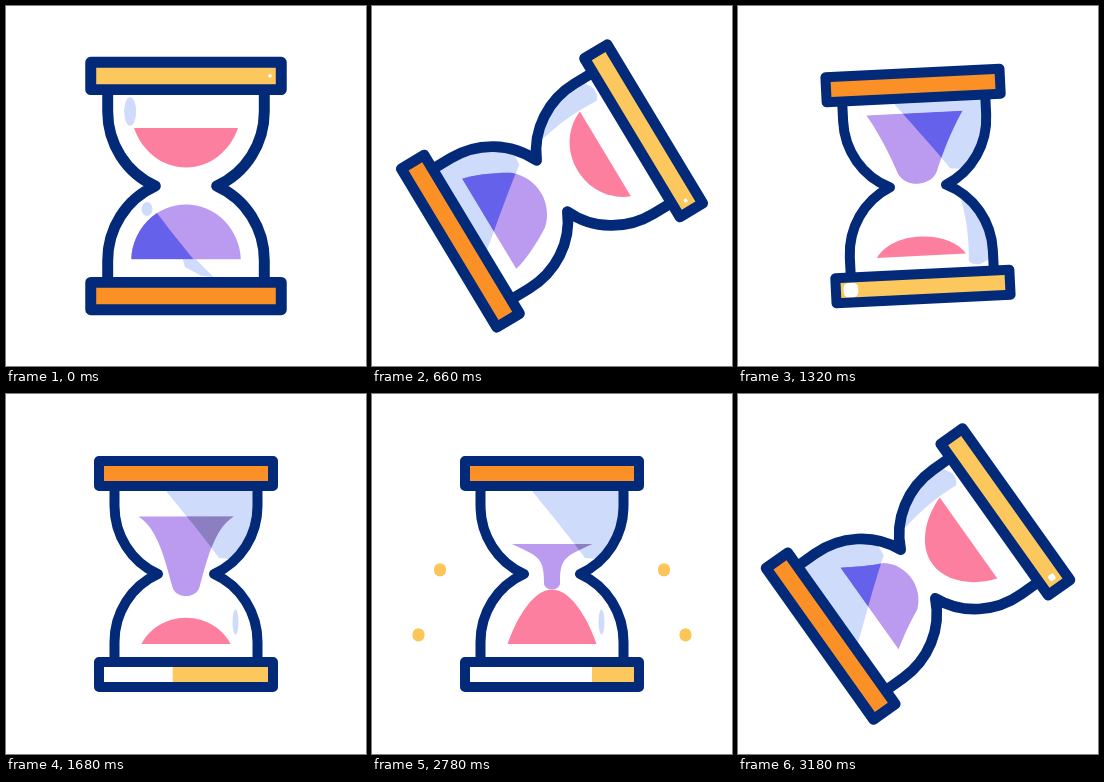
Animation, 360 px wide and 360 px high, one loop 3200 ms. Source, as an HTML page:

```html
<!DOCTYPE html>
<html lang="en">
<head>
<meta charset="utf-8">
<title>Hourglass</title>
<style>
html, body { margin: 0; width: 100%; height: 100%; overflow: hidden; background: #fff; }
svg { display: block; width: 100vw; height: 100vh; }
.line { stroke: #022a78; stroke-width: 10; stroke-linejoin: round; }
.shade { fill: #cfdbfa; }
.drop { fill: #fcc557; }
</style>
</head>
<body>
<svg viewBox="-180 -180 360 360">
  <defs>
    <path id="wall" d="M-71.5 -88V-68C-71.5 -39 -55 -12 -28 0C-55 12 -71.5 39 -71.5 68V88"/>
    <clipPath id="inside">
      <path d="M-71 -88V-68C-71 -39 -55 -12 -28 0C-55 12 -71 39 -71 68V88H71V68C71 39 55 12 28 0C55 -12 71 -39 71 -68V-88Z"/>
    </clipPath>
    <clipPath id="inSand"><path id="sandClip"/></clipPath>
    <path id="gloss" d="M-23 -87C-8 -68 14 -42 33 -16L80 -12V-87Z"/>
  </defs>
  <g id="drops"></g>
  <g id="glass">
    <g clip-path="url(#inside)">
      <use id="fullShade" class="shade" href="#gloss"/>
      <path id="band" class="shade" d="M42 14C48 40 48 60 47 77Q49 81 58 81L80 70V14Z"/>
      <ellipse id="glint" class="shade"/>
      <g id="restShade" class="shade">
        <ellipse cx="35.6" cy="-21" rx="5" ry="6.5"/>
        <path d="M3 -66L-9 -67L-25 -83L-14 -82L1 -74Z"/>
      </g>
      <path id="sand" fill="#bb9bf0"/>
      <g clip-path="url(#inSand)"><use id="overlap" href="#gloss"/></g>
      <path id="mound" fill="#fc7fa0"/>
    </g>
    <g class="line" fill="none">
      <use href="#wall"/>
      <use href="#wall" transform="scale(-1 1)"/>
    </g>
    <rect class="line" x="-87" y="-113" width="174" height="25" fill="#fb9027"/>
    <rect x="-87" y="88" width="174" height="25" fill="#fcc75c"/>
    <rect id="shine" fill="#fff"/>
    <rect class="line" x="-87" y="88" width="174" height="25" fill="none"/>
  </g>
</svg>
<script>
const LOOP = 3200, REST = 220, POUR = 1400, LIFT = 2800;
const $ = id => document.getElementById(id);
const set = (el, attrs) => { for (const k in attrs) el.setAttribute(k, attrs[k]); };
const show = (id, on) => set($(id), { visibility: on ? "visible" : "hidden" });
const clamp = x => Math.min(1, Math.max(0, x));
const mix = (a, b, u) => a + (b - a) * u;
const sine = x => (1 - Math.cos(Math.PI * clamp(x))) / 2;

const drops = [-1, 1].flatMap(side => [0, 1].map(row => {
  const el = document.createElementNS("http://www.w3.org/2000/svg", "rect");
  el.setAttribute("class", "drop");
  $("drops").append(el);
  return { el, x: side * (112 + 21.5 * row), y: 65 * row };
}));

// 1 = upside down, 0 = upright
function turn(t) {
  if (t < REST) return 1;
  return t < POUR + 100 ? 1 - sine((t - 180) / 1240) : sine((t - LIFT) / 606);
}

// In the shapes below p is the turn and q the share of sand poured out;
// each measure blends from its upright value to its upside-down value.
function moundShape(p, q) {
  const w = mix(44.5, 47.5, p), base = mix(70, 53, p);
  const h = mix(19 + 36 * q, 36, p);
  const rise = mix(0.6, 0.38, q * (1 - p));
  const top = base - h, sx = 0.84 * w, sy = base - rise * h, tx = 0.46 * w;
  return `M${-w} ${base}C${-sx} ${sy} ${-tx} ${top} 0 ${top}C${tx} ${top} ${sx} ${sy} ${w} ${base}Z`;
}

function sandShape(p, q) {
  const left = (1 - q) ** 3;
  const moundTop = 51 - 36 * q;
  const w = mix(48 - 8 * q * q, 50, p);
  const level = mix(-30 - 43 * (1 - q) ** 2, -67, p);
  const low = mix(Math.min(120 * q - 2, moundTop), -17, p);
  const neck = mix(8 + 11 * left, 35, p);
  const neckY = low - 6 - neck / 4;
  const ax = mix(15 + 25 * left, 50, p), ay = level + 12;
  const bx = neck + 9 * mix(1 - q, 1, p), by = neckY - mix(25, 9, p);
  const tipX = 8 + neck / 5, tipY = mix(neckY, low, 4 / 3);
  return `M${-w} ${level}C${-ax} ${ay} ${-bx} ${by} ${-neck} ${neckY}` +
    `C${-tipX} ${tipY} ${tipX} ${tipY} ${neck} ${neckY}C${bx} ${by} ${ax} ${ay} ${w} ${level}Z`;
}

function drawShine(p, q) {
  const len = 3 + (1 - p) ** 3 * (12 + 107 * clamp(2.5 * q));
  const h = Math.min(16, len);
  set($("shine"), {
    x: -78 - Math.min(4, len / 12), y: 100.5 - h / 2,
    width: len, height: h, rx: len < 20 ? h / 3 : 0
  });
}

function drawDrops(t) {
  const u = clamp((t - 1830) / 1070);
  const h = Math.min(18, 120 * u, 118 * (1 - u)), w = Math.min(12, h);
  const fall = -77 + 82 * u;
  for (const { el, x, y } of drops)
    set(el, { x: x - w / 2, y: y + fall - h / 2, width: w, height: h, rx: w / 2, ry: w / 2 });
}

function draw(t) {
  const p = turn(t), q = clamp((t - POUR) / (LIFT - POUR));
  const rest = t < REST, moving = !rest && p > 0.005;
  set($("glass"), { transform: `rotate(${-180 * p}) scale(${1 + 0.095 * p})` });

  const sand = sandShape(p, q);
  set($("sand"), { d: sand });
  set($("sandClip"), { d: sand });
  set($("mound"), { d: moundShape(p, q) });

  show("fullShade", !rest);
  show("restShade", rest);
  show("band", moving);
  show("glint", !moving);
  set($("glint"), rest ? { cx: 51, cy: 68, rx: 5.5, ry: 13 } : { cx: 49.5, cy: 48, rx: 3, ry: 12.5 });
  set($("overlap"), { fill: moving || rest ? "#6661eb" : "#8b7fc2" });

  drawShine(p, q);
  drawDrops(t);
}

const start = performance.now();
function tick() {
  draw((performance.now() - start) % LOOP);
  requestAnimationFrame(tick);
}
tick();
</script>
</body>
</html>
```
